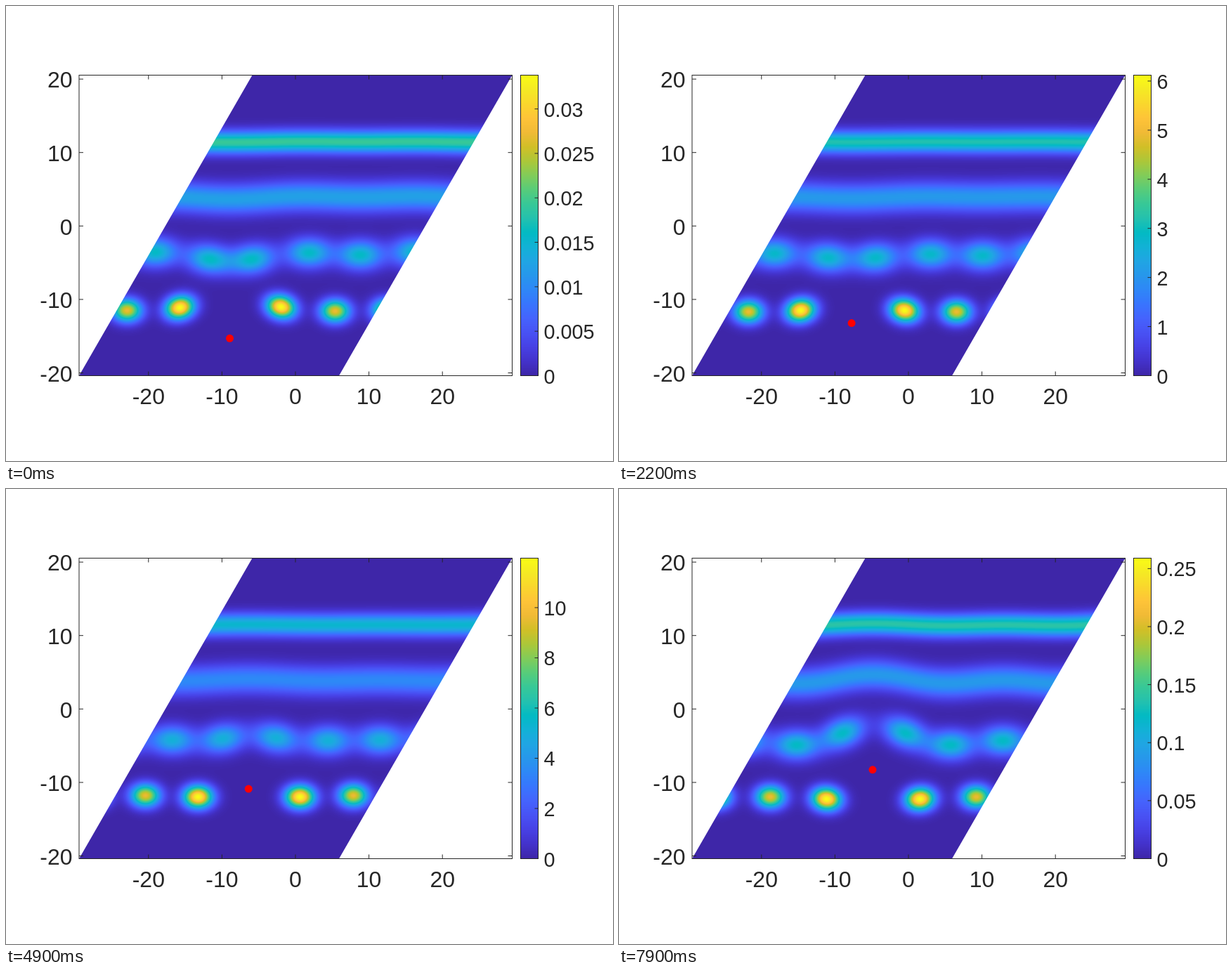
An HTML page with a canvas that plays this animation: 864x648 px, repeating every 8000 ms.

```html
<!DOCTYPE html>
<html lang="en">
<head>
<meta charset="utf-8">
<title>Density plot</title>
<style>
html, body { margin: 0; width: 100%; height: 100%; overflow: hidden; background: #fff; }
canvas { display: block; }
</style>
</head>
<body>
<canvas id="stage" width="864" height="648"></canvas>
<script>
const ctx = document.getElementById('stage').getContext('2d');
const LOOP = 8000, STEP = 300, FIRST = 100;
const LEFT = 104, TOP = 98, W = 617, H = 429, PERIOD = 370;
const INK = '#262626', FONT = '"Liberation Sans", Arial, sans-serif';

// Colour map with 256 levels
const stops = ('3e26a8 4332cb 4741e5 4852f4 4563fd 3875fe 2e87f7 2797eb 20a5e3 12b1d6 02bac3 ' +
  '24c1ae 37c897 57cc7a 81cc59 abc739 d1bf27 f0ba36 fec338 fad62d f5e924 f9fb15')
  .split(' ').map(h => [0, 2, 4].map(i => parseInt(h.slice(i, i + 2), 16)));
const colours = Array.from({ length: 256 }, (_, i) => {
  const p = i / 255 * (stops.length - 1), n = Math.min(Math.floor(p), stops.length - 2);
  return stops[n].map((c, j) => Math.round(c + (stops[n + 1][j] - c) * (p - n)));
});

// Polynomial through the points (xs, ys)
function curve(xs, ys, x) {
  return ys.reduce((sum, y, i) =>
    sum + xs.reduce((p, xj, j) => j === i ? p : p * (x - xj) / (xs[i] - xj), y), 0);
}
const KEYS = [0, 8, 17, 27];
const at = (ys, k) => curve(KEYS, ys, k);

const PEAK_KEYS = [0, 5, 8, 13, 17, 21, 27];
const PEAKS = [0.0338, 1.54, 6.12, 15.85, 11.97, 4.14, 0.259].map(Math.log);

// Blob paths as x and y at the keys; lean gives the sign of the tilt
const upper = [
  { x: [212, 221, 236, 252], y: [350, 352, 357, 364], lean: 0 },
  { x: [289, 297, 308, 318], y: [360, 358, 355, 347], lean: -1 },
  { x: [350, 365, 384, 407], y: [360, 358, 354, 347], lean: 1 },
  { x: [431, 443, 458, 472], y: [351, 353, 358, 364], lean: 0 },
  { x: [504, 517, 532, 546], y: [354, 355, 357, 358], lean: 0 }
];
const lower = [
  { x: [172, 184, 198, 215], y: [433, 435, 436, 438], lean: 0 },
  { x: [247, 258, 273, 295], y: [429, 433, 438, 441], lean: -1 },
  { x: [391, 406, 418, 428], y: [428, 433, 438, 441], lean: 1 },
  { x: [468, 480, 494, 508], y: [434, 435, 436, 438], lean: 0 }
];

const field = new Float32Array(W * H);
const layer = document.createElement('canvas');
layer.width = W;
layer.height = H;
const layerCtx = layer.getContext('2d');
const image = layerCtx.createImageData(W, H);

function addBand(y0, sigma, amp, wave, dotX) {
  for (let i = 0; i < W; i++) {
    const a = 2 * Math.PI * (i + LEFT - dotX) / PERIOD;
    const mid = y0 - TOP + wave * (Math.cos(a) + Math.cos(2 * a));
    const end = Math.min(H, mid + 70);
    for (let j = Math.max(0, Math.floor(mid - 70)); j < end; j++) {
      field[j * W + i] += amp * Math.exp(-((j - mid) ** 2) / (2 * sigma * sigma));
    }
  }
}

function addBlob(x, y, sx, sy, amp, degrees) {
  const c = Math.cos(degrees * Math.PI / 180), s = Math.sin(degrees * Math.PI / 180);
  x -= LEFT;
  y -= TOP;
  const right = Math.min(W, x + 90), bottom = Math.min(H, y + 70);
  for (let j = Math.max(0, Math.floor(y - 70)); j < bottom; j++) {
    for (let i = Math.max(0, Math.floor(x - 90)); i < right; i++) {
      const dx = i - x, dy = j - y;
      const u = (dx * c + dy * s) / sx, v = (dy * c - dx * s) / sy;
      field[j * W + i] += amp * Math.exp(-(u * u + v * v) / 2);
    }
  }
}

function addRow(blobs, k, sx, sy, amp, tilt) {
  for (const b of blobs) {
    for (const shift of [-PERIOD, 0, PERIOD]) {
      addBlob(at(b.x, k) + shift, at(b.y, k), sx, sy, amp(b), b.lean * tilt);
    }
  }
}

function paintField(k, dotX) {
  field.fill(0);
  const wave = at([1.4, 0.9, -1, -4], k);
  addBand(193, 11, at([0.57, 0.52, 0.45, 0.54], k), wave / 4, dotX);
  addBand(272, 14.5, at([0.365, 0.34, 0.29, 0.34], k), wave, dotX);
  const amp = at([0.47, 0.46, 0.42, 0.47], k);
  addRow(upper, k, 22, 14, () => amp, at([-8, -4, 10, 22], k));
  addRow(lower, k, 14.6, 11.3, b => b.lean ? 1 : 0.8, at([15, 11, 0, -6], k) * -1 + 2 * at([15, 11, 0, -6], k));

  for (let n = 0; n < field.length; n++) {
    const c = colours[Math.min(255, Math.floor(field[n] * 256))];
    image.data.set(c, n * 4);
    image.data[n * 4 + 3] = 255;
  }
  layerCtx.putImageData(image, 0, 0);

  ctx.save();
  ctx.beginPath();
  ctx.moveTo(350.5, 98.5);
  ctx.lineTo(720.5, 98.5);
  ctx.lineTo(474, 526.5);
  ctx.lineTo(104, 526.5);
  ctx.clip();
  ctx.drawImage(layer, LEFT, TOP);
  ctx.restore();
}

function line(x1, y1, x2, y2) {
  ctx.beginPath();
  ctx.moveTo(x1, y1);
  ctx.lineTo(x2, y2);
  ctx.stroke();
}

function label(text, x, y, align, size) {
  ctx.font = size + 'px ' + FONT;
  ctx.textAlign = align;
  ctx.fillStyle = INK;
  ctx.fillText(text, x, y);
}

function paintAxes() {
  ctx.strokeStyle = INK;
  ctx.lineWidth = 1;
  ctx.strokeRect(104, 98.5, 616.5, 428);
  for (let v = -20; v <= 20; v += 10) {
    const x = 412 + v * 10.46, y = 313.3 - v * 10.46;
    line(x, 526.5, x, 520.5);
    line(x, 98.5, x, 104.5);
    line(104, y, 110, y);
    line(720.5, y, 714.5, y);
    label(v, x, 566.5, 'center', 32);
    label(v, 94.5, y + 12.2, 'right', 32);
  }
}

function paintBar(peak) {
  const x = 732.5, y = 98.5, w = 25, h = 428;
  colours.forEach((c, i) => {
    ctx.fillStyle = `rgb(${c})`;
    const top = Math.round(y + h * (1 - (i + 1) / 256));
    ctx.fillRect(x, top, w, Math.round(y + h * (1 - i / 256)) - top);
  });
  ctx.strokeRect(x, y, w, h);

  const unit = 10 ** Math.floor(Math.log10(peak / 7));
  const step = [1, 2, 5, 10].map(m => m * unit).find(s => peak / s <= 7);
  for (let n = 0; n * step <= peak; n++) {
    const ty = y + h * (1 - n * step / peak);
    line(x + w - 5, ty, x + w, ty);
    label(+(n * step).toFixed(4), 765.5, ty + 11, 'left', 28.8);
  }
}

function paint(k) {
  const dotX = 318.5 + 1.574 * k, dotY = 473.3 - 2.72 * k;
  ctx.fillStyle = '#fff';
  ctx.fillRect(0, 0, 864, 648);
  paintField(k, dotX);
  paintAxes();
  paintBar(Math.exp(curve(PEAK_KEYS, PEAKS, k)));
  ctx.fillStyle = '#f00';
  ctx.beginPath();
  ctx.arc(dotX, dotY, 5.5, 0, 2 * Math.PI);
  ctx.fill();
}

let shown = -1;
function tick() {
  const t = performance.now() % LOOP;
  const k = t < FIRST ? 0 : 1 + Math.floor((t - FIRST) / STEP);
  if (k !== shown) paint(shown = k);
  requestAnimationFrame(tick);
}
tick();
</script>
</body>
</html>
```
